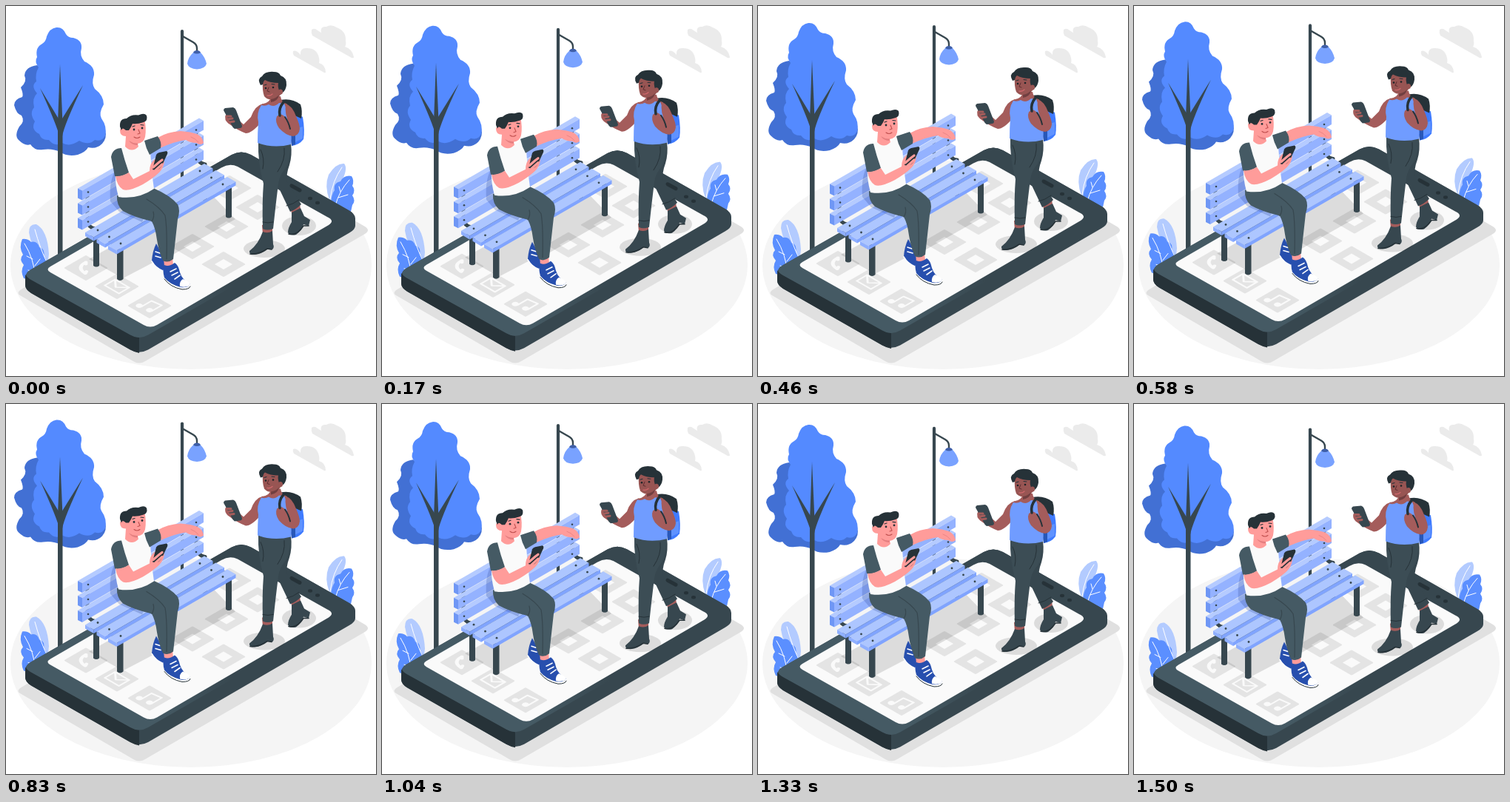
An HTML page for the animation above (1540 ms loop, 500 by 500 pixels).

```html
<!DOCTYPE html>
<html lang="en">
<head>
<meta charset="utf-8">
<title>Park bench on a phone</title>
<style>
  html, body { margin: 0; width: 100%; height: 100%; overflow: hidden; background: #fff; }
  svg { display: block; width: 100%; height: 100%; }
  .line { fill: none; stroke-linecap: round; stroke-linejoin: round; }
</style>
</head>
<body>
<svg viewBox="0 0 500 500">
  <defs>
    <linearGradient id="bezel" gradientUnits="userSpaceOnUse" x1="110" y1="400" x2="290" y2="330">
      <stop offset=".4" stop-color="#455a64"/>
      <stop offset="1" stop-color="#37474f"/>
    </linearGradient>
    <g id="backPlank">
      <path fill="#b5cbff" d="M0 0 6 3 170-91.5 164-95Z"/>
      <path fill="#94b2ff" d="M6 3 170-91.5V-79L6 16Z"/>
      <path fill="#6f97f5" d="M0 0 6 3V16L0 13Z"/>
      <g fill="#37474f"><circle cx="14" cy="5" r="1.3"/><circle cx="160" cy="-79" r="1.3"/></g>
    </g>
    <g id="seatPlank">
      <path fill="#adc6ff" d="M0 0 11.500 6.600 172.500-86.400 161-93Z"/>
      <path fill="#80a4ff" d="M11.500 6.600 172.500-86.400V-81.400L11.500 11.600Z"/>
      <path fill="#8fafff" d="M0 0 11.500 6.600V11.600L0 5Z"/>
      <g fill="#37474f"><circle cx="17" cy="-3" r="1.4"/><circle cx="155" cy="-83" r="1.4"/></g>
    </g>
    <rect id="tile" x="-17.3" y="-17.3" width="34.6" height="34.6" rx="1.5" fill="#e4e4e4"/>
  </defs>

  <!-- still backdrop -->
  <ellipse cx="250" cy="350" rx="244" ry="141" fill="#f5f5f5"/>
  <path fill="#e0e0e0" d="M19 391 172 480Q180 485 188 480L485 308Q493 303 485 298L326 206Q318 202 310 206L19 384Q14 388 19 391Z"/>
  <g fill="#ebebeb">
    <path d="M413 32Q417 29 421 33L426 36Q424 27 433 28Q439 24 447 29Q460 34 459 47Q460 53 458 55Q468 58 470 69Q470 71 467 70L414 40Q412 36 413 32Z"/>
    <path d="M388 61Q392 59 398 66Q397 56 407 57Q420 57 423 70Q424 74 423 77Q431 79 432 89Q432 91 430 90L389 67Q387 64 388 61Z"/>
  </g>

  <g id="scene">
    <!-- plants -->
    <path fill="#b3cbff" d="M56 352Q36 335 31 306Q31 294 41 295Q56 303 58 335Z"/>
    <path fill="#5b8fff" d="M24 368Q19 358 24 350Q17 342 23 336Q17 326 22 315Q29 314 34 319Q42 317 45 326Q53 328 51 338Q58 344 54 355L40 372Z"/>
    <path fill="#b3cbff" d="M437 262Q430 243 436 228Q446 212 457 213Q462 219 455 234L443 268Z"/>
    <path fill="#5b8fff" d="M439 266Q440 254 444 249Q442 239 452 237Q457 228 467 230Q471 236 468 243Q473 249 468 256Q473 263 468 269L466 278Z"/>
    <g class="line" stroke="#fff" stroke-width="1">
      <path d="M39 302Q46 328 56 348M25 321Q38 342 40 368M36 342 28 338M39 351 46 342M40 360 30 357"/>
      <path d="M454 218Q441 236 438 261M464 235Q450 250 445 270M452 251 450 244M449 259 462 255"/>
    </g>

    <!-- tree -->
    <path fill="#4270d4" d="M42 80Q26 82 25 94Q29 102 20 110Q24 120 22 123Q11 126 11 134Q14 146 21 148Q26 156 18 163Q11 175 17 181Q26 190 33 187Q39 196 50 194Q62 192 73 197Q82 204 97 201Q108 197 111 191Q122 194 130 186Q137 178 134 168L110 120Z"/>
    <path fill="#548aff" d="M68 29Q77 28 81 38Q84 43 91 43Q103 46 102 57Q99 67 106 75Q120 81 119 93Q115 105 120 112Q132 121 132 133Q125 145 129 152Q137 163 134 175Q130 184 120 181Q112 189 99 182Q86 191 76 185Q66 191 58 181Q48 182 45 173Q33 167 39 156Q31 145 38 137Q35 124 42 118Q33 108 41 102Q39 92 44 83Q38 75 42 69Q39 56 49 51Q54 48 55 41Q59 30 68 29Z"/>
    <g fill="#37474f">
      <path d="M73 79 76.500 158V336H70V158Z"/>
      <path d="M46 111 72 154V176Q70 164 46 111ZM104 107 76 152V176Q78 162 104 107Z"/>
    </g>

    <!-- lamp -->
    <path class="line" stroke="#37474f" stroke-width="4.2" d="M238 34V236"/>
    <path class="line" stroke="#37474f" stroke-width="2.4" d="M239 41 253 49Q258 52 258 57V62"/>
    <path fill="#79a2ff" d="M253 63Q258 60 263 63Q269 69 271 78Q269 85 258 85.500Q247 85 245 78Q246 69 253 63Z"/>
    <path fill="#3f5fa8" d="M253 63Q254 60 258 60Q262 60 263 63Q258 66 253 63Z"/>

    <!-- phone -->
    <path fill="#37474f" d="M26 367Q26 361 34 356L305 201Q318 194 331 201L463 276Q472 281 472 287V297Q472 302 464 306.500L192 464.500Q180 471 168 464.500L34 388Q26 383 26 377Z"/>
    <path fill="#263238" d="M26 363Q27 366 34 370L168 444Q174 448 180 448V469Q174 468 168 464.500L34 388Q26 383 26 377Z"/>
    <path fill="url(#bezel)" d="M34 370Q21 363 34 356L305 201Q318 194 331 201L463 276Q475 282 463 289L192 444.500Q180 451.500 168 444.500Z"/>
    <path fill="#fafafa" d="M60 352 291 218.500Q302 212 313 217L434 285Q445 290 436 296L204 431Q195 436 186 431L60 360Q53 356 60 352Z"/>
    <path class="line" stroke="#263238" stroke-width="5" d="M386 243 397 249"/>
    <g fill="#263238"><ellipse cx="411" cy="260" rx="3" ry="2.200"/><ellipse cx="421" cy="266" rx="3" ry="2.200"/></g>
    <g id="tiles"></g>

    <!-- contact shadows -->
    <g fill="#000" fill-opacity=".12">
      <path d="M112 342 158 368 200 346Q215 352 222 338L310 288 275 252Z"/>
      <ellipse cx="349" cy="328" rx="28" ry="12"/>
      <ellipse cx="396" cy="297" rx="23" ry="13"/>
    </g>

    <!-- bench -->
    <g fill="#37474f">
      <path d="M265 230H272V262Q268 265 265 262ZM118 308H126V351Q122 354 118 351ZM150 328H158.500V369Q154 373 150 369ZM297 242H305V285Q301 288 297 285Z"/>
      <path d="M120 306 268 220 302 236 148 326Z"/>
    </g>
    <path class="line" stroke="#37474f" stroke-width="5" d="M110 255V290Q111 299 120 301M257 170V200Q259 213 269 214"/>
    <use href="#backPlank" x="97" y="286.500"/>
    <use href="#backPlank" x="97" y="266.500"/>
    <use href="#backPlank" x="97" y="246.500"/>
    <use href="#seatPlank" x="107" y="306"/>
    <use href="#seatPlank" x="122.500" y="315"/>
    <use href="#seatPlank" x="138" y="324"/>
    <path fill="#1c3a8a" fill-opacity=".22" d="M148 222Q139 236 141 264L153 278 184 292 200 250Z"/>

    <!-- seated man -->
    <path fill="#ff9c9a" d="M205 178Q218 170 236 169Q250 170 258 173Q266 177 267 185Q263 189 257 185Q249 185 243 181Q228 183 208 192Z"/>
    <path class="line" stroke="#e57f80" stroke-width=".8" d="M250 177Q256 179 260 184"/>
    <path fill="#274fae" d="M203 321Q198 331 197 344Q202 354 212 358L216 350 211 336Z"/>
    <path class="line" stroke="#fff" stroke-width="1.600" d="M197 345Q202 354 212 358M202 332 208 334M202 338 209 340"/>
    <path fill="#ff9c9a" d="M213 340H225L226 351Q220 356 214 352Z"/>
    <path fill="#fff" d="M213 364Q219 379 236 383.500Q249 384 249.500 377L236 368Z"/>
    <path fill="#274fae" d="M214 350Q220 353 228 347Q233 350 235 360Q238 370 249 376Q246 381 236 380Q221 376 214 367Q211 357 214 350Z"/>
    <path fill="#fff" d="M239 369Q249 373 249 377Q244 381 235 379Q234 372 239 369Z"/>
    <path class="line" stroke="#fff" stroke-width="1.600" d="M222 359 230 355M224 364 232 360M228 369 235 364"/>
    <path class="line" stroke="#263238" stroke-width="1" d="M214 369Q222 380 238 383Q248 383 249 379"/>
    <path fill="#455a64" d="M150 256Q176 262 199 246Q222 256 232 268Q236 276 232 288L226 342Q219 348 212 344Q206 330 204 316Q202 300 197 291Q172 285 158 277Q149 269 150 256Z"/>
    <path class="line" stroke="#37474f" stroke-width="1.200" d="M190 261Q208 272 215 283Q218 300 217 342M197 291Q201 285 199 278"/>
    <path fill="#fafafa" d="M160 190Q176 197 188 182L194 186Q196 208 197 225L200 247Q178 262 152 258Q147 240 148 225L151 194Z"/>
    <path fill="#455a64" d="M156 192Q144 192 142 204L147 230Q156 232 166 225Q160 208 156 192ZM187 182 205 176Q211 184 209 192L194 201Q189 192 187 182Z"/>
    <path fill="#ff9c9a" d="M148 230Q156 231 166 225L172 234 194 223Q194 213 200 208Q208 205 214 210Q213 219 207 225Q200 232 185 241Q166 251 158 248Q150 243 148 230Z"/>
    <path fill="#263238" d="M203 201Q204 199 207 198L217 196Q219 197 218 200L210 217Q207 221 203 222L198 221Z"/>
    <path class="line" stroke="#ff9c9a" stroke-width="3.200" d="M199 218 207 211 211 208M202 222 211 214"/>
    <path fill="#ff9c9a" d="M164 158 187 153Q190 165 188 177Q186 185 178 186L179 190Q170 199 161 190L162 176Q154 176 154 168Q155 163 162 166Z"/>
    <path fill="#e57f80" d="M166 182Q172 186 178 185.500L178 188Q170 188 166 182Z"/>
    <path fill="#263238" d="M154 163Q153 152 163 152Q169 146 179 147.500Q187 144 190 148Q192 155 186 157Q177 160 171 159Q169 164 166 168L162 168Q157 163 156 168Z"/>
    <g fill="#263238"><circle cx="173" cy="167" r="1.400"/><circle cx="184" cy="165" r="1.400"/></g>
    <path class="line" stroke="#263238" stroke-width="1.200" d="M171 163 174 162M182 160.500 186 161"/>
    <path class="line" stroke="#c0504f" stroke-width="1.100" d="M179 167 181 172 178 173M173 177Q177 180 181 177"/>

    <!-- walking woman -->
    <path fill="#3f7bff" d="M384 140 401 150Q404 168 402 180Q396 188 386 189Z"/>
    <path fill="#2857b8" d="M384 174 391 172V187L386 189Z"/>
    <path fill="#5f92ff" d="M391 166 401 163V179L391 184Z"/>
    <path fill="#263238" d="M371 127Q386 124 398 133Q401 142 399 152L388 147 378 135Z"/>
    <path fill="#a45c5b" d="M384 270 397 266 398 276Q392 281 386 280ZM346 296H360V308H347Z"/>
    <g fill="#37474f">
      <path d="M386 279 398 273 403 284 411 289 409 297 402 295Q400 303 392 309Q384 311 381 306Q381 300 386 292Z"/>
      <path d="M347 305Q354 308 360 304L361 322Q363 326 360 329L354 328Q346 335 336 336Q328 336 329 331Q341 322 347 305Z"/>
      <path d="M360 186 385 186Q387 202 383 215Q378 228 380 238L399 268Q392 275 384 278L365 238Z"/>
    </g>
    <path class="line" stroke="#263238" stroke-width="1.600" d="M330 335Q342 336 353 328L359 329M382 308Q393 311 402 297L409 297"/>
    <path fill="#3c4d55" d="M341 183Q362 192 384 186Q385 205 378 219Q370 228 368 240Q364 272 361 301Q353 304 347 301Q346 265 348 240Q340 212 341 183Z"/>
    <path class="line" stroke="#263238" stroke-width="1" d="M376 192Q378 208 367 224M344 194Q350 206 347 220M347 292Q354 294 361 292M379 270Q388 268 396 262"/>
    <g fill="#a45c5b">
      <path d="M347 132Q336 135 331 150L321 160Q314 154 309 149L297 147Q294 154 301 159Q313 168 324 172Q332 172 344 158Z"/>
      <path d="M346 132.500Q357 131 358 122H371Q372 130 380 132.500L379 152H345Z"/>
    </g>
    <path fill="#709cff" d="M345 134Q350 136 355 133Q362 138 369 131L376 132Q381 142 383 160Q387 172 385 187Q362 193 340 185Q340 170 341 157Q338 145 345 134Z"/>
    <path fill="#a45c5b" d="M378 132Q387 135 392 149Q397 160 397 166Q396 175 388 176Q378 175 369 165Q363 156 366 149Q372 144 376 149L383 160Q376 146 378 132Z"/>
    <path class="line" stroke="#263238" stroke-width="3.600" d="M375 130Q368 138 370 148"/>
    <path class="line" stroke="#263238" stroke-width="2" d="M377 150Q382 157 384 166"/>
    <path fill="#37474f" d="M296 138 307 137Q310 138 311 141L319 162Q319 165 316 165L309 166Q306 164 305 161L294 141Q294 139 296 138Z"/>
    <path class="line" stroke="#a45c5b" stroke-width="3" d="M298 149 304 149M299 153 306 152M301 157 308 156"/>
    <path fill="#985553" d="M347 100Q346 114 349 122Q353 127 360 126L367 124 373 118Q375 108 367 101L358 97Z"/>
    <path fill="#713f40" d="M358 126Q365 125 369 120Q368 128 358 130Z"/>
    <path fill="#263238" d="M344 107Q339 98 346 95Q350 88 362 89Q369 89 371 94Q380 97 379 107Q378 114 374 117Q372 111 369 114Q367 108 368 104Q357 104 350 100Q348 101 347 106Z"/>
    <ellipse cx="371" cy="116" rx="3" ry="3.500" fill="#985553"/>
    <circle cx="372.500" cy="121" r="1.500" fill="#fff"/>
    <g fill="#1b2327"><circle cx="351" cy="111" r="1.300"/><circle cx="361" cy="110" r="1.300"/></g>
    <path class="line" stroke="#263238" stroke-width="1.100" d="M349 107 352 106M359 105.500 363 106"/>
    <path class="line" stroke="#5c2c30" stroke-width="1" d="M355 110 353 115 356 116"/>
    <path class="line" stroke="#d0686c" stroke-width="1.300" d="M353 121Q357 122 360 119"/>
  </g>
</svg>
<script>
  const LOOP = 1540, TOP_TIME = 705, RISE = 10, START = 9.16;

  const light = 'stroke="#fafafa" stroke-width="2.4" class="line"';
  const glyphs = {
    call: `<path ${light} style="stroke-width:4" d="M-8-7Q-8 7 7 8M-8-8-5-5M7 8 5 4"/>`,
    mail: `<path ${light} d="M-11-8H11V8H-11ZL0 2 11-8"/>`,
    music: `<path ${light} d="M-5 7V-8L9-10V5"/><g fill="#fafafa"><circle cx="-8" cy="8" r="4"/><circle cx="6" cy="6" r="4"/></g>`,
    plain: '<path fill="#fafafa" d="M-7-7H7V7H-7Z"/>'
  };
  const tiles = [
    [108, 354, 'call'], [150, 379, 'mail'], [194, 405, 'music'], [252, 325, 'plain'],
    [294, 349, 'plain'], [298, 298, 'plain'], [340, 272, 'plain'], [302, 246, 'plain']
  ];
  document.getElementById('tiles').innerHTML = tiles.map(([x, y, kind]) =>
    `<g transform="matrix(.866 .5 -.866 .5 ${x} ${y})"><use href="#tile"/>${glyphs[kind]}</g>`).join('');

  // Linear float: up and down once per loop.
  const scene = document.getElementById('scene');
  function draw(now) {
    const fromTop = Math.abs((now % LOOP) - TOP_TIME);
    const distance = Math.min(fromTop, LOOP - fromTop);
    const y = distance / (LOOP / 2) * RISE - START;
    scene.setAttribute('transform', `translate(0 ${y.toFixed(2)})`);
    requestAnimationFrame(draw);
  }
  draw(performance.now());
</script>
</body>
</html>
```
